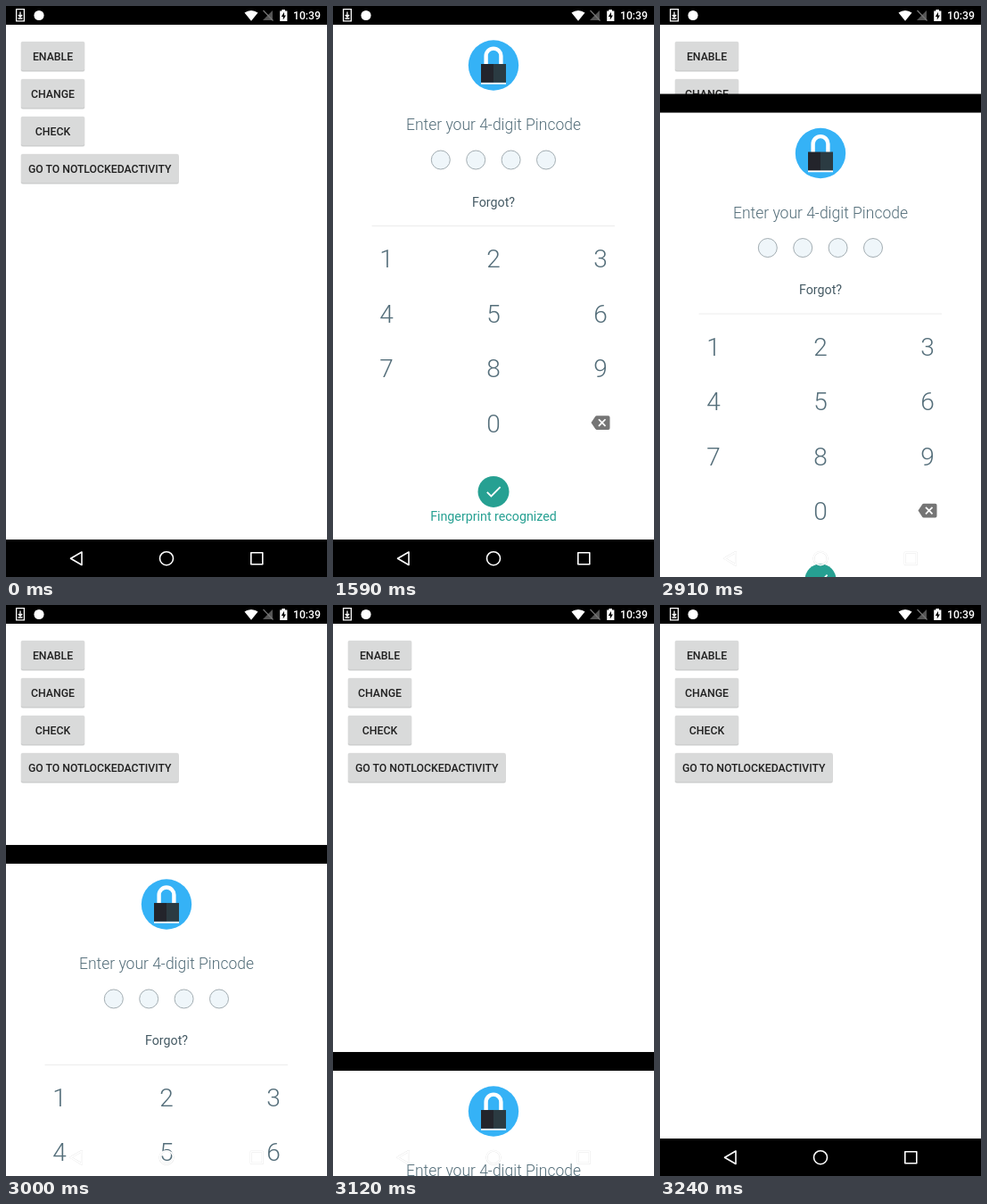
An HTML page that plays this animation: 360 px wide and 640 px high, repeating every 3980 ms.

```html
<!DOCTYPE html>
<html lang="en">
<head>
<meta charset="utf-8">
<title>Pin lock</title>
<style>
html, body { margin: 0; width: 100%; height: 100%; overflow: hidden; background: #fff; }
svg { display: block; width: 360px; height: 640px; font-family: Roboto, sans-serif; }
text { text-anchor: middle; }
.button { font-size: 12.25px; font-weight: 500; fill: #212121; }
.title { font-size: 17.5px; font-weight: 300; fill: #546e7a; }
.key { font-size: 28px; font-weight: 300; fill: #546e7a; }
.label { font-size: 14.25px; fill: #455a64; }
.line { fill: none; stroke: #fff; }
</style>
</head>
<body>
<svg viewBox="0 0 360 640">
  <defs>
    <g id="navIcons" fill="none" stroke-linejoin="round">
      <path d="M72.5 619.2 85 612V626.5Z"/>
      <circle cx="180" cy="619.2" r="7.5"/>
      <path d="M274.8 612.8h13v13h-13Z"/>
    </g>
  </defs>

  <rect width="360" height="640"/>
  <rect y="21" width="360" height="577" fill="#fff"/>
  <g id="menu"></g>

  <g id="panel">
    <rect width="360" height="640"/>
    <rect y="21" width="360" height="577" fill="#fff"/>
    <circle cx="180" cy="66.5" r="28.2" fill="#35b2f6"/>
    <path class="line" stroke-width="4.4" d="M171.6 66V56a8.4 8.4 0 0 1 16.8 0V66"/>
    <path fill="#fff" d="M166 85.5h28v2.2h-28Z"/>
    <path fill="#23242b" d="M166 65h14v20.8h-14Z"/>
    <path fill="#2b3b42" d="M180 65h14v20.8h-14Z"/>
    <text class="title" x="180" y="139.3">Enter your 4-digit Pincode</text>
    <g id="dots" fill="#eff6fa" stroke="#a3adb2"></g>
    <text class="label" x="180" y="224.5">Forgot?</text>
    <path stroke="#ececec" d="M43.5 246.5H316"/>
    <g id="keys"></g>
    <path transform="translate(289.5 456.5) scale(.875)" fill="#757575" d="M22 3H7q-1 0-1.6.9L0 12l5.4 8.1Q6 21 7 21h15a2 2 0 0 0 2-2V5a2 2 0 0 0-2-2ZM19 15.6 17.6 17 14 13.4 10.4 17 9 15.6 12.6 12 9 8.4 10.4 7 14 10.6 17.6 7 19 8.4 15.4 12Z"/>
    <g id="waiting">
      <circle cx="180" cy="544.4" r="17.5" fill="#6c858f"/>
      <path class="line" transform="translate(169.5 533.9) scale(.875)" stroke-width="1.1" stroke-linecap="round" d="M6 4Q12 .8 18 4M3.5 9.6C7.5 3.4 16.5 3.4 20.5 9.6M9.7 21.5C5 17 4.6 14 5 11.6 6 4.6 18 4.6 19 11.6 19.4 15.6 14.6 15.6 14.4 12.2 14 8.8 9.8 9 9.6 12.2 9.5 16.5 12.5 19.8 16 20.6M14.5 21.8C8.5 19.8 7 15.5 7.3 12 8 6.6 16 6.6 16.8 12M12 12C12 16 15 18.6 18.8 17.8M4.2 17Q2.8 14.5 3.2 12.5"/>
    </g>
    <g id="accepted">
      <circle cx="180" cy="544.4" r="17.5" fill="#26a092"/>
      <path class="line" stroke-width="1.8" d="M172.8 544.8 177.4 549.4 187.6 539.2"/>
      <text class="label" x="180" y="576.8" style="fill:#26a092">Fingerprint recognized</text>
    </g>
  </g>

  <g id="statusIcons" fill="#fff">
    <path class="line" stroke-width="1.3" d="M11.6 3.6h8.8v13.2h-8.8ZM16 6.5V12M13.8 10 16 12.3 18.2 10M13.5 14h5"/>
    <circle cx="37" cy="10.5" r="5.6"/>
    <path d="M267.5 7.5Q275 2.5 282.5 7.5L275 16.7Z"/>
    <path fill="#555" d="M299 5V16H288Z"/>
    <path stroke="#777" stroke-width="1.2" d="M288.5 5 299.5 16.5"/>
    <path d="M309.4 4h3.6v1.4h2.4V17h-8.2V5.4h2.2Z"/>
    <path fill="#000" d="M312 6.8 308.8 12h2V15.5L314 10.4h-2Z"/>
    <text class="button" x="337.5" y="15.2" style="fill:#fff">10:39</text>
  </g>
  <use href="#navIcons" stroke="#0002" stroke-width="2.1"/>
  <use href="#navIcons" stroke="#fff" stroke-width="1.6"/>
</svg>
<script>
const LOOP = 3980, SHOW = 330, ACCEPT = 1590, SLIDE = 2820, END = 3240, STEP = 30;
const el = id => document.getElementById(id);

el("menu").innerHTML = ["ENABLE", "CHANGE", "CHECK", "GO TO NOTLOCKEDACTIVITY"].map((label, i) => {
  const y = 40 + 42 * i, w = i < 3 ? 71 : 176.5;
  return `<rect x="16.5" y="${y - .3}" width="${w + 1}" height="34" rx="2" fill="#e8e8e8"/>
    <rect x="17" y="${y + 1}" width="${w}" height="32.3" rx="2" fill="#c8c9c9"/>
    <rect x="17" y="${y}" width="${w}" height="32.3" rx="2" fill="#d9dada"/>
    <text class="button" x="${17 + w / 2}" y="${y + 21}">${label}</text>`;
}).join("");

el("dots").innerHTML = [0, 1, 2, 3].map(i =>
  `<circle cx="${120.8 + 39.4 * i}" cy="172.5" r="10.5"/>`).join("");

el("keys").innerHTML = [..."123456789 0"].map((key, i) =>
  `<text class="key" x="${60 + 120 * (i % 3)}" y="${293 + 61.5 * Math.floor(i / 3)}">${key}</text>`).join("");

// Ease-in-out drop of the panel, sampled at the screen's refresh step.
function slideOffset(t) {
  if (t < SLIDE) return 0;
  const k = Math.floor((t - SLIDE) / STEP) - 6;
  const phase = .449 + k * (k < 0 ? .0641 : .0606);
  return 320 * (1 - Math.cos(Math.PI * phase));
}

function show(id, visible) {
  el(id).style.display = visible ? "" : "none";
}

function draw() {
  const t = performance.now() % LOOP;
  show("panel", t >= SHOW && t < END);
  show("waiting", t < ACCEPT);
  show("accepted", t >= ACCEPT);
  el("panel").setAttribute("transform", `translate(0 ${slideOffset(t)})`);
  requestAnimationFrame(draw);
}
draw();
</script>
</body>
</html>
```
